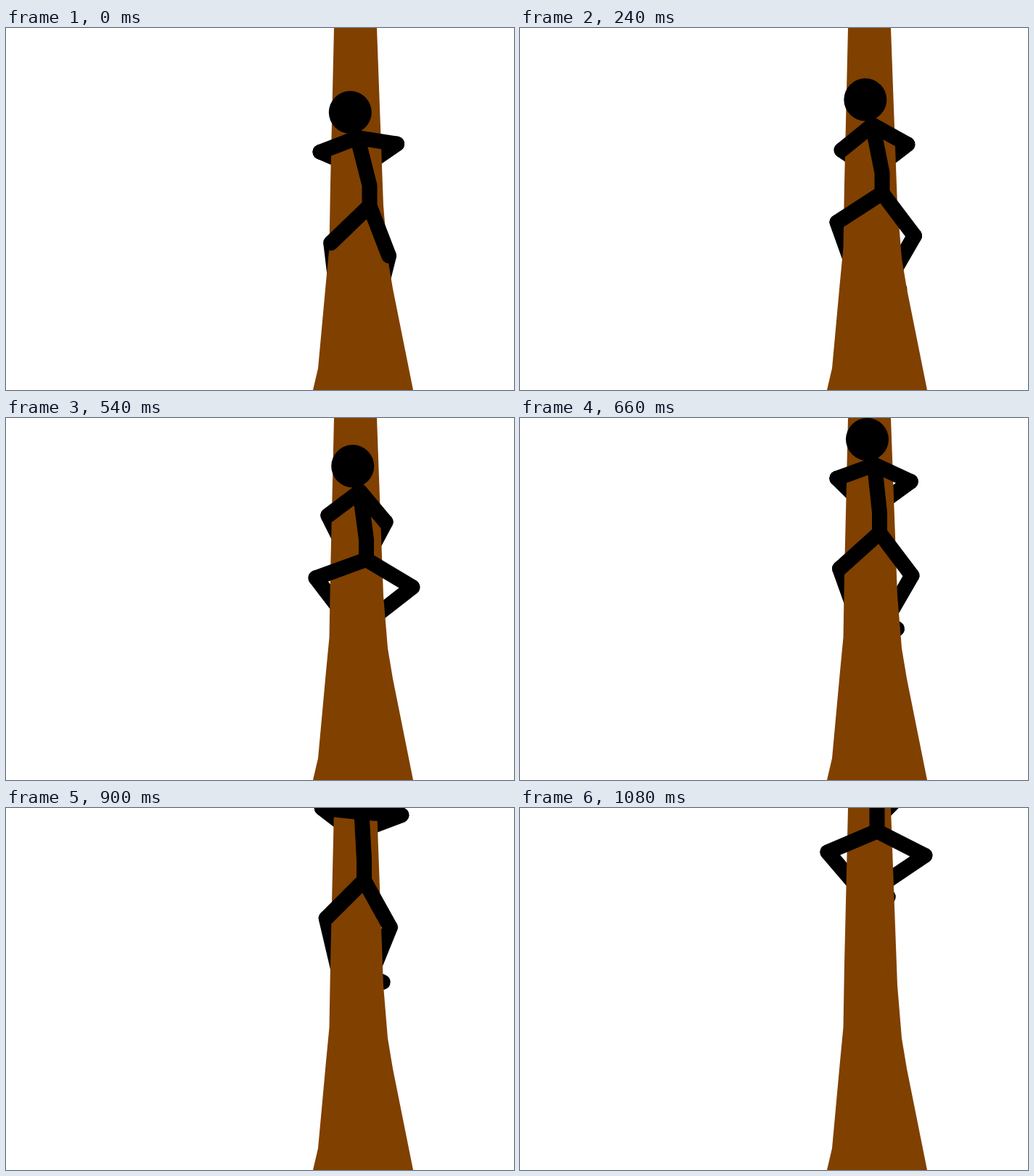
These frames come from a looping animation (700x500 px, 1140 ms). An HTML page with a canvas:

```html
<!DOCTYPE html>
<html lang="en">
<head>
<meta charset="utf-8">
<title>Climber</title>
<style>
  html, body { margin: 0; height: 100%; overflow: hidden; background: #fff; }
  canvas { display: block; }
</style>
</head>
<body>
<canvas id="stage" width="700" height="500"></canvas>
<script>
const ctx = document.getElementById('stage').getContext('2d');
const STEP = 60, STEPS = 19, LAUNCH = 9;
const HEAD = 29.5, LIMB = 21, NECK = 35, SPINE = 94, ARM = 55, LEG = 74, FOOT = 19;
const LEFT = -1, RIGHT = 1;

const trunk = new Path2D('M452 0H511L515 110 520 245 526 318 533 360 561 500H423L430 470 441 350 445.5 303 447 215 449 130Z');

// Key poses of the two pulls: head height, then limb angles in degrees out from straight down
const keys = [0, 4, 6, 9, 11, 15, 18];
const headY = [116.5, 99, 76.5, 66.5, 29.5, -29, -97];
const armL = [69, 51, 44, 53, 70, 96, 55];
const armR = [81, 61, 45, 40, 65, 86, 49];
const thighL = [46, 57, 66, 70, 48, 45, 67];
const thighR = [21, 37, 50, 59, 37, 29, 63];

// Smooth curve through the key values
function track(values, t) {
  const last = keys.length - 1;
  const i = Math.max(0, keys.findLastIndex((k, n) => n < last && t >= k));
  const span = keys[i + 1] - keys[i], u = (t - keys[i]) / span;
  const slope = k => {
    const a = Math.max(k - 1, 0), b = Math.min(k + 1, last);
    return (values[b] - values[a]) / (keys[b] - keys[a]) * span;
  };
  return values[i] + (values[i + 1] - values[i]) * u * u * (3 - 2 * u)
    + slope(i) * u * (1 - u) ** 2 - slope(i + 1) * u * u * (1 - u);
}

function reach([x, y], side, length, degrees) {
  const a = degrees * Math.PI / 180;
  return [x + side * length * Math.sin(a), y + length * Math.cos(a)];
}

function line(...points) {
  ctx.beginPath();
  points.forEach(p => ctx.lineTo(...p));
  ctx.stroke();
}

function draw(t) {
  const head = [474.3 + 0.38 * t, track(headY, t)];
  const shoulder = [head[0] + 10, head[1] + NECK];
  const hip = [501 - 0.5 * t, shoulder[1] + SPINE];
  const waist = [hip[0], hip[1] - 28];

  const elbowL = reach(shoulder, LEFT, ARM, track(armL, t));
  const elbowR = reach(shoulder, RIGHT, ARM, track(armR, t));
  // Hands hold on during the first pull, then slide up
  const slide = Math.max(0, (t - LAUNCH) / LAUNCH);
  const grip = 187 - 180 * (1 - (1 - slide) ** 2);

  const bend = track(thighR, t), shinR = bend - 7;
  const kneeL = reach(hip, LEFT, LEG, track(thighL, t));
  const kneeR = reach(hip, RIGHT, LEG, bend);
  const ankleL = reach(kneeL, RIGHT, LEG, bend * 0.8 - 10);
  const ankleR = reach(kneeR, LEFT, LEG, shinR);
  const toe = reach(ankleR, RIGHT, FOOT, 90 - shinR);

  ctx.fillStyle = '#fff';
  ctx.fillRect(0, 0, 700, 500);
  ctx.lineWidth = LIMB;
  ctx.lineCap = ctx.lineJoin = 'round';

  // Forearms and shins wrap behind the trunk
  line(elbowL, [470, grip]);
  line(elbowR, [500, grip]);
  line(kneeL, ankleL);
  line(kneeR, ankleR, toe);

  ctx.fillStyle = '#804000';
  ctx.fill(trunk);

  line(elbowL, shoulder, elbowR);
  line(shoulder, waist, hip);
  line(kneeL, hip, kneeR);
  ctx.fillStyle = '#000';
  ctx.beginPath();
  ctx.arc(...head, HEAD, 0, 2 * Math.PI);
  ctx.fill();
}

const start = performance.now();
function tick() {
  draw(Math.floor((performance.now() - start) / STEP) % STEPS);
  requestAnimationFrame(tick);
}
tick();
</script>
</body>
</html>
```
